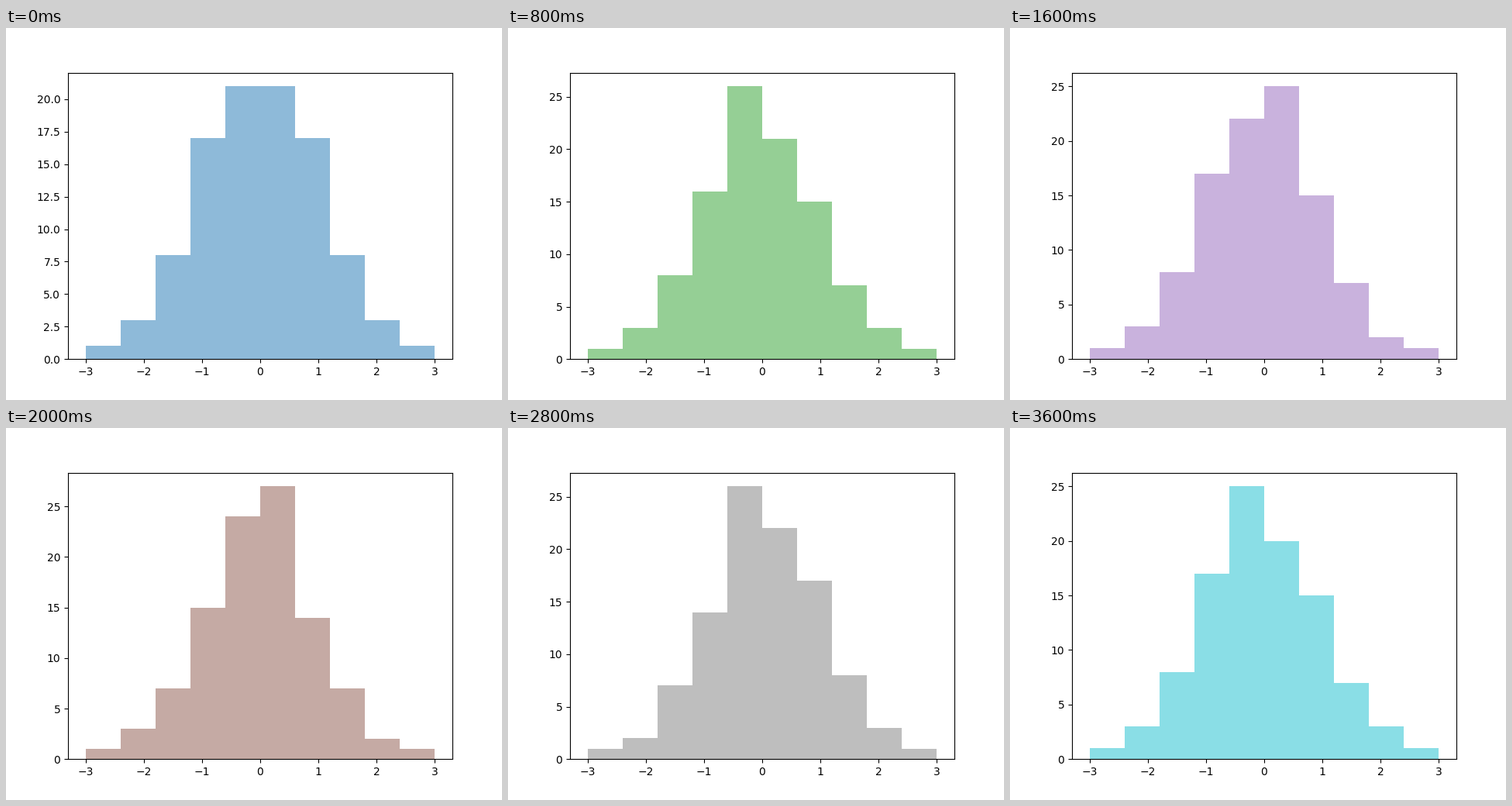
Animation, 640 px wide and 480 px high, one loop 4 s. Source, as a matplotlib script:

```python
import numpy as np
import matplotlib.pyplot as plt
from matplotlib.animation import FuncAnimation

TOTAL = 100
EDGES = np.linspace(-3, 3, 11)
CENTERS = (EDGES[:-1] + EDGES[1:]) / 2

# Share of each bar beyond the middle, falling like a normal density
TAIL = np.exp(-CENTERS[6:] ** 2 / 2)
TAIL /= TAIL.sum()

# Per sample: the two middle bars and how many values lie left of them
SAMPLES = [
    (21, 21, 29), (18, 35, 24), (26, 21, 27), (23, 32, 26), (22, 25, 28),
    (24, 27, 26), (27, 21, 27), (26, 22, 24), (15, 25, 25), (25, 20, 29),
]

fig, ax = plt.subplots(figsize=(6.4, 4.8), dpi=100)


def bar_counts(mid_left, mid_right, left):
    right = TOTAL - mid_left - mid_right - left
    return np.round([*left * TAIL[::-1], mid_left, mid_right, *right * TAIL])


def update(i):
    ax.cla()
    ax.hist(CENTERS, bins=EDGES, weights=bar_counts(*SAMPLES[i]),
            color=f"C{i}", alpha=0.5)


anim = FuncAnimation(fig, update, frames=len(SAMPLES), interval=400,
                     init_func=lambda: None, repeat=True, repeat_delay=0)
plt.show()
```
